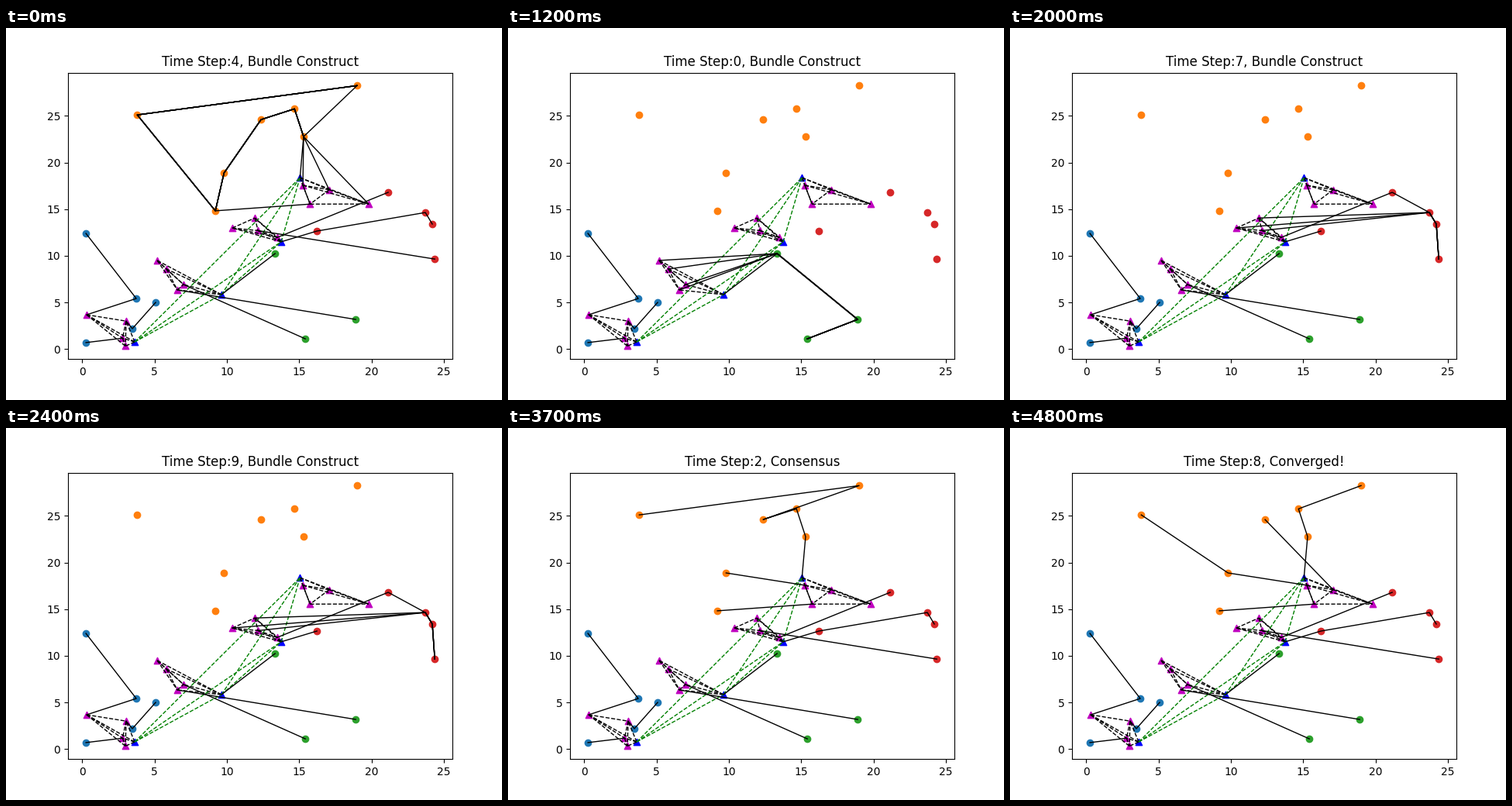
A matplotlib script for the animation above (4.9 s loop, 640x480 px).

```python
from itertools import combinations

import matplotlib.pyplot as plt
from matplotlib.animation import FuncAnimation

# Task positions per team, listed in the order the teams are solved
TASKS = {
    "blue": [(0.25, 12.4), (3.73, 5.42), (5.07, 5.0), (3.46, 2.19), (0.25, 0.7)],
    "green": [(13.33, 10.24), (15.42, 1.1), (18.9, 3.18)],
    "red": [(21.15, 16.8), (16.22, 12.65), (23.72, 14.64), (24.2, 13.4),
            (24.37, 9.65)],
    "orange": [(3.8, 25.1), (9.2, 14.82), (9.8, 18.88), (12.36, 24.6),
               (14.67, 25.75), (15.3, 22.77), (19.0, 28.24)],
}

# The first agent of each team is its leader
AGENTS = {
    "blue": [(3.62, 0.77), (0.3, 3.68), (3.03, 3.0), (2.78, 1.17), (2.98, 0.32)],
    "green": [(9.62, 5.84), (5.18, 9.5), (5.82, 8.58), (6.57, 6.34), (7.0, 6.92)],
    "red": [(13.75, 11.5), (10.37, 12.98), (11.93, 14.05), (12.15, 12.7),
            (13.5, 11.98)],
    "orange": [(15.05, 18.37), (15.25, 17.56), (17.07, 17.08), (15.75, 15.54),
               (19.8, 15.55)],
}

TEAMS = list(TASKS)

# Task order of each agent, one word per agent, "-" for an empty path
FINAL = {
    "blue": "- 10 32 4 -",
    "green": "0 - - 2 1",
    "red": "123 - - 4 0",
    "orange": "546 20 3 1 -",
}

# (first step, paths): a plan holds until the next one starts
BUNDLES = {
    "blue": [(0, "3210 43210 3210 4321 43210")],
    "green": [(0, "021 021 021 021 021")],
    "red": [(0, "1 234 234 234 0234")],
    "orange": [(0, "5432106 5432106 5432106 1234560 5432106"),
               (6, "543601 213460 213460 1254360 213460")],
}
CONSENSUS = {
    "blue": [(0, FINAL["blue"])],
    "green": [(0, FINAL["green"])],
    "red": [(0, "1 - - - 0234"), (9, FINAL["red"])],
    "orange": [(0, "54360 2 - 1 -"), (3, "54 2 3 10 -"), (5, FINAL["orange"])],
}

# (team, first step, number of steps)
RUNS = [("orange", 4, 1), ("blue", 0, 1), ("red", 0, 2), ("orange", 4, 2),
        ("green", 0, 1), ("orange", 7, 2), ("orange", 1, 1), ("red", 7, 3),
        ("orange", 2, 3), ("orange", 0, 9)]


def plan_at(plans, step):
    return [paths for start, paths in plans if start <= step][-1]


def build_stages():
    stages = []
    for team, first, count in RUNS:
        for step in range(first, first + count):
            stages.append((team, step, "Bundle Construct",
                           plan_at(BUNDLES[team], step)))
            stages.append((team, step, "Consensus",
                           plan_at(CONSENSUS[team], step)))
    team, step = stages[-1][:2]
    return stages[:-2] + [(team, step, "Converged!", FINAL[team])]


STAGES = build_stages()

fig, ax = plt.subplots(figsize=(6.4, 4.8), dpi=100)
ax.set_xlim(-0.99, 25.59)
ax.set_ylim(-1.07, 29.63)
title = ax.set_title("")


def link_all(points, color):
    for a, b in combinations(points, 2):
        ax.plot(*zip(a, b), "--", color=color, lw=1)


for team in TEAMS:
    ax.scatter(*zip(*TASKS[team]), color=f"tab:{team}")
for team in TEAMS:
    ax.scatter(*zip(*AGENTS[team][1:]), color="m", marker="^")
leaders = [AGENTS[team][0] for team in TEAMS]
ax.scatter(*zip(*leaders), color="b", marker="^")

for team in TEAMS:
    link_all(AGENTS[team], "k")
link_all(leaders, "g")

routes = {team: [ax.plot([], [], "k-", lw=1)[0] for _ in AGENTS[team]]
          for team in TEAMS}


def show_paths(team, paths):
    for line, agent, path in zip(routes[team], AGENTS[team], paths.split()):
        stops = [TASKS[team][int(c)] for c in path if c != "-"]
        line.set_data(*zip(agent, *stops))


def update(i):
    current, step, phase, paths = STAGES[i]
    title.set_text(f"Time Step:{step}, {phase}")
    rank = TEAMS.index(current)
    for k, team in enumerate(TEAMS):
        if k < rank:
            show_paths(team, FINAL[team])
        elif k == rank:
            show_paths(team, paths)
        else:
            show_paths(team, "- - - - -")
    return [title, *sum(routes.values(), [])]


anim = FuncAnimation(fig, update, frames=len(STAGES), interval=100,
                     repeat=True, repeat_delay=0, blit=False)
plt.show()
```
